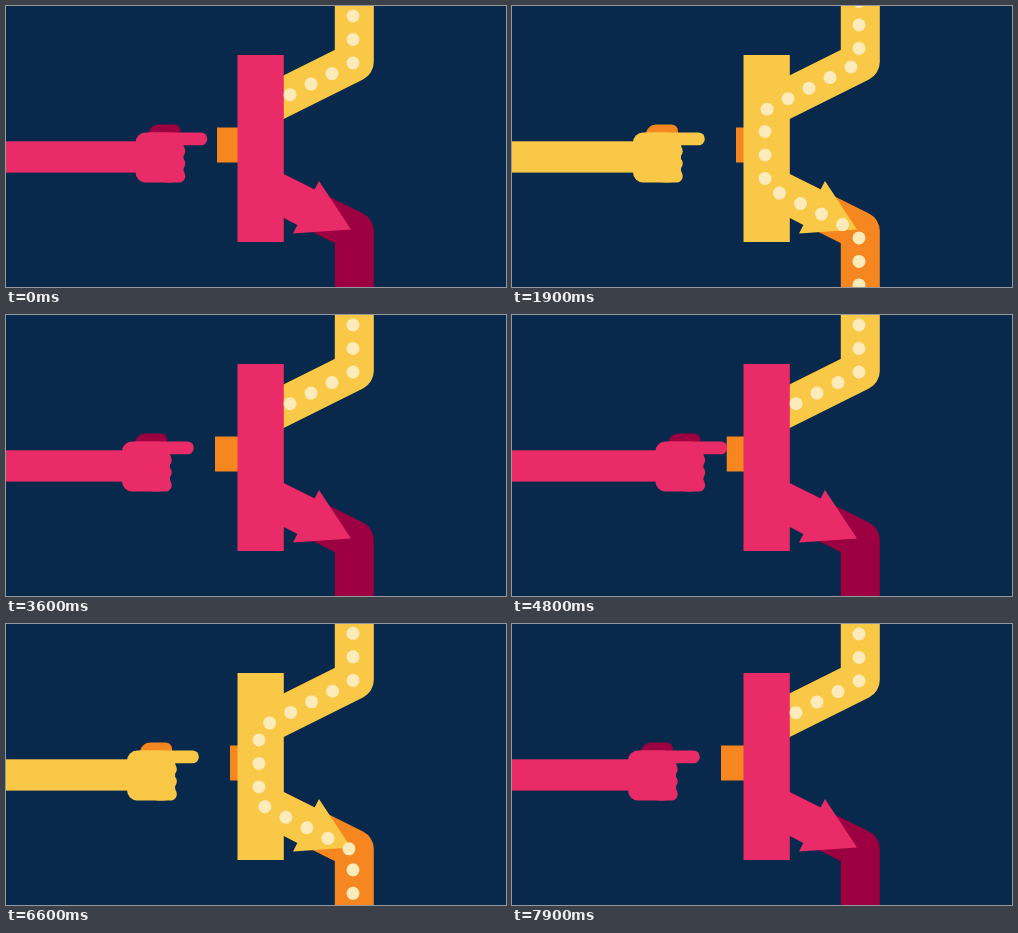
Write an HTML page that moves like this. It is 500 px wide and 281 px high and loops after 8 s.

```html
<!DOCTYPE html>
<html lang="en">
<head>
<meta charset="utf-8">
<title>Push-button flow</title>
<style>
  html, body { margin: 0; width: 100%; height: 100%; overflow: hidden; background: #08294b; }
  svg { display: block; width: 100vw; height: 100vh; --main: #e92c67; --shade: #9c0040; }
  svg.on { --main: #f9c846; --shade: #f6861f; }
  .main { fill: var(--main); }
  .shade { fill: var(--shade); }
  .pipe { fill: none; stroke-width: 39; stroke-linejoin: round; }
  #dots { fill: none; stroke: #fdebb9; stroke-width: 13; stroke-linecap: round; stroke-dasharray: 0 23.5; }
</style>
</head>
<body>
<svg id="stage" viewBox="0 0 500 281">
  <path class="pipe" stroke="#f9c846" d="M348.3-30V56L260 100"/>
  <path class="pipe" stroke="var(--shade)" d="M260 181L348.3 225V310"/>
  <rect id="button" y="121.5" width="40" height="35" fill="#f6861f"/>
  <g class="main">
    <rect x="231.5" y="49" width="46.3" height="187"/>
    <path d="M277 167.7L308.6 183.5L313 175L345 223.5L287 227.5L291.4 219L277 211.5Z"/>
  </g>
  <path id="dots"/>
  <g id="hand">
    <path class="shade" d="M12.5 130C13 123 17 118.5 24 118.5H38Q45 118.5 45 126V130Z"/>
    <g class="main">
      <rect x="-200" y="135.3" width="215" height="31.3"/>
      <rect y="126.5" width="46" height="50" rx="10"/>
      <rect x="8" y="126.5" width="63.8" height="12.8" rx="6.4"/>
      <rect x="30" y="137" width="18" height="33"/>
      <rect x="25" y="138.5" width="24.7" height="13" rx="6.3"/>
      <rect x="25" y="151" width="24.7" height="13" rx="6.3"/>
      <rect x="25" y="163.5" width="24.7" height="13" rx="6.3"/>
    </g>
  </g>
</svg>
<script>
const [stage, button, dots, hand] =
  ["stage", "button", "dots", "hand"].map(id => document.getElementById(id));

const LOOP = 8000, CYCLE = 4540, FIRST_ON = 448, ON_TIME = 2142;
const SPEED = 0.087, GAP = 23.5;
const INLET = "M347-37V57L";
const BLOCKED = INLET + "283 89.2";
const OPEN = INLET + "253 104.3V179.8L347 226.8V310";

const progress = (t, start, end) => Math.min(1, Math.max(0, (t - start) / (end - start)));
const push = p => p ** 1.8;
const retreat = p => (1 - p) ** 3;

function draw(now) {
  // u counts from the moment the flow is switched on
  const u = (now % LOOP - FIRST_ON + CYCLE) % CYCLE;
  const on = u < ON_TIME;
  const press = on ? progress(u, 1590, ON_TIME) : progress(u, 3552, CYCLE);
  const x = on
    ? 121 + 35 * retreat(progress(u, 0, 620)) + 33 * push(press)
    : 116 + 38 * retreat(progress(u, ON_TIME, 2890)) + 40 * push(press);
  const rest = on ? 224 : 209 + 3.7 * press;
  const phase = 10 + (on ? u * SPEED : 0);

  stage.classList.toggle("on", on);
  hand.setAttribute("transform", `translate(${x})`);
  const left = Math.max(rest, x + 71.3);
  button.setAttribute("x", left);
  button.setAttribute("width", 235 - left);
  dots.setAttribute("d", on ? OPEN : BLOCKED);
  // the path starts two gaps above the resting dot
  dots.setAttribute("stroke-dashoffset", -((phase - 10) % GAP));
}

const start = performance.now();
function tick() {
  draw(performance.now() - start);
  requestAnimationFrame(tick);
}
tick();
</script>
</body>
</html>
```
